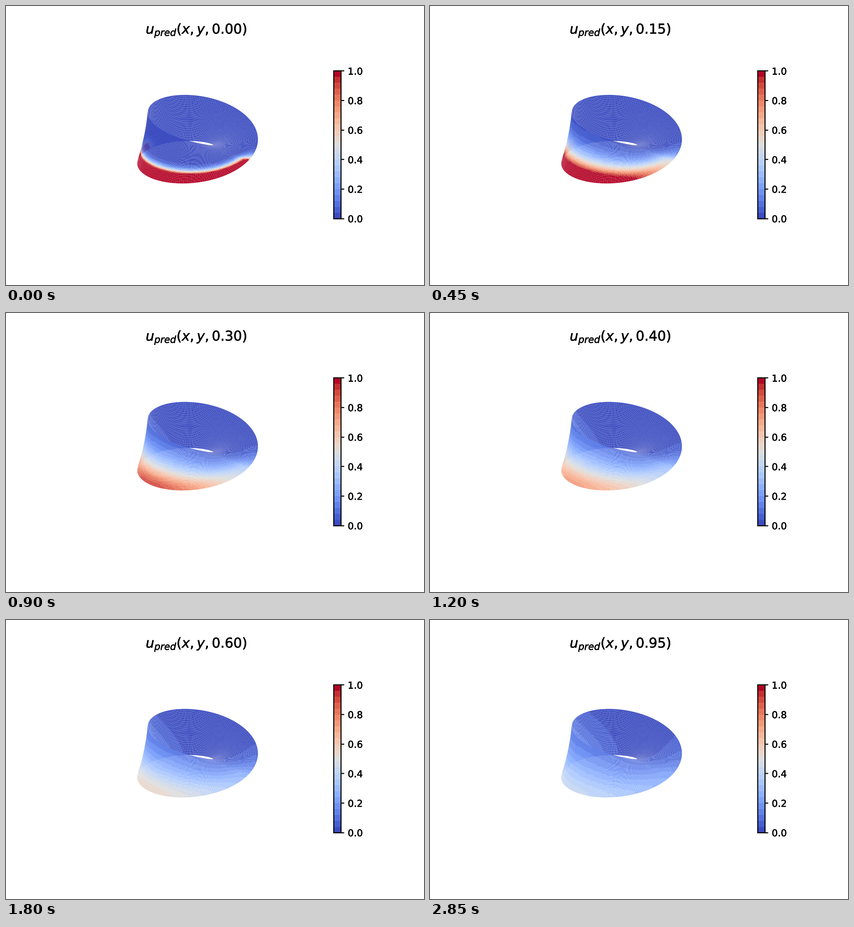
Recreate the animation shown at these times as a matplotlib script. Size 917 by 611 pixels, loop 3000 ms.

```python
import numpy as np
import matplotlib.pyplot as plt
from matplotlib.animation import FuncAnimation
from matplotlib.cm import ScalarMappable
from matplotlib.collections import PolyCollection
from matplotlib.colors import Normalize
from matplotlib.patheffects import withStroke

W, H, DPI = 917, 611, 128
PT = 150 / DPI              # layout is designed in points at 150 dpi
FRAMES, INTERVAL = 20, 150
NU, NV = 200, 40
BOX = 462                   # side of the square 3D view in pixels
CX, CY = 417, 304           # centre of that view
TAU = 2 * np.pi

plt.rcParams.update({
    "font.family": "DejaVu Sans",
    "mathtext.fontset": "dejavusans",
    "font.size": 10 * PT,
    "axes.linewidth": 1.1 * PT,
    "ytick.major.width": 1.1 * PT,
    "ytick.major.size": 3.5 * PT,
    "ytick.major.pad": 3.5 * PT,
})
HEAVY = [withStroke(linewidth=0.3 * PT, foreground="black")]


def mobius(u, v):
    r = 1 + v / 2 * np.cos(u / 2)
    return np.stack([r * np.cos(u), r * np.sin(u), v / 2 * np.sin(u / 2)], -1)


def project(p, elev=np.radians(30), azim=np.radians(-60), dist=10):
    """Perspective view of a 4:4:3 box; returns pixels and nearness."""
    lo, hi = p.min((0, 1)), p.max((0, 1))
    span = (hi - lo) * 1.1
    span[2] = 2
    q = (p - (lo + hi) / 2) / span * np.array([8, 8, 6]) / 7
    se, ce, sa, ca = np.sin(elev), np.cos(elev), np.sin(azim), np.cos(azim)
    right = q @ np.array([-sa, ca, 0])
    up = q @ np.array([-se * ca, -se * sa, ce])
    near = q @ np.array([ce * ca, ce * sa, se])
    scale = BOX / 0.185 / (dist - near)
    shift = BOX * 0.0025 / 0.185
    return np.stack([CX + shift + right * scale,
                     CY - shift - up * scale], -1), near


def quads(a):
    """Four corners of every grid cell, one row per cell."""
    corners = [a[:-1, :-1], a[1:, :-1], a[1:, 1:], a[:-1, 1:]]
    return np.stack(corners, 2).reshape((NU * NV, 4) + a.shape[2:])


def spread(u, v, t):
    """Patch on the second half of the unrolled band, diffusing with t."""
    peak = 1 / (0.2 + 3.3 * t - 1.05 * t**2)
    rate = 1 / (0.1 + 2.2 * t - t**2)
    narrow = 0.5 / (1 + 1.9 * t)
    centre = 4.55 - 0.25 * t
    across = np.hypot(v + 1, 0.6) - 0.6
    outside = np.maximum(abs(u - 1.5 * np.pi) - np.pi / 2 + 0.1, 0)
    return peak * np.exp(-rate * across - narrow * (u - centre)**2
                         - outside / (0.1 + 0.9 * t))


def field(u, v, t):
    # the band rejoins itself with v flipped
    return spread(u, v, t) + spread(u + TAU, -v, t)


u, v = np.meshgrid(np.linspace(0, TAU, NU + 1), np.linspace(-1, 1, NV + 1),
                   indexing="ij")
pixels, near = project(mobius(u, v))
order = np.argsort(quads(near).mean(1))
cell_u = quads(u).mean(1)[order]
cell_v = quads(v).mean(1)[order]

cmap = plt.get_cmap("coolwarm", 25)
norm = Normalize(0, 1, clip=True)

fig = plt.figure(figsize=(W / DPI, H / DPI), dpi=DPI, facecolor="white")
ax = fig.add_axes([0, 0, 1, 1])
ax.set_xlim(0, W)
ax.set_ylim(H, 0)
ax.axis("off")

band = PolyCollection(quads(pixels)[order], linewidths=0, edgecolors="none",
                      antialiaseds=True)
ax.add_collection(band, autolim=False)
title = ax.text(417.5, 60.5, "", fontsize=14.3 * PT, ha="center",
                va="baseline", path_effects=HEAVY)

bar_h = 0.7 * BOX
cax = fig.add_axes([718.9 / W, 1 - (CY + bar_h / 2) / H,
                    bar_h / 20 / W, bar_h / H])
fig.colorbar(ScalarMappable(norm, cmap), cax=cax,
             ticks=np.linspace(0, 1, 6), format="%.1f")
for label in cax.get_yticklabels():
    label.set_path_effects(HEAVY)


def update(i):
    t = i / FRAMES
    band.set_facecolor(cmap(norm(field(cell_u, cell_v, t))))
    title.set_text(rf"$u_{{pred}}(x,y,{t:.2f})$")
    return band, title


anim = FuncAnimation(fig, update, frames=FRAMES, interval=INTERVAL,
                     repeat=True, repeat_delay=0, blit=False)
plt.show()
```
